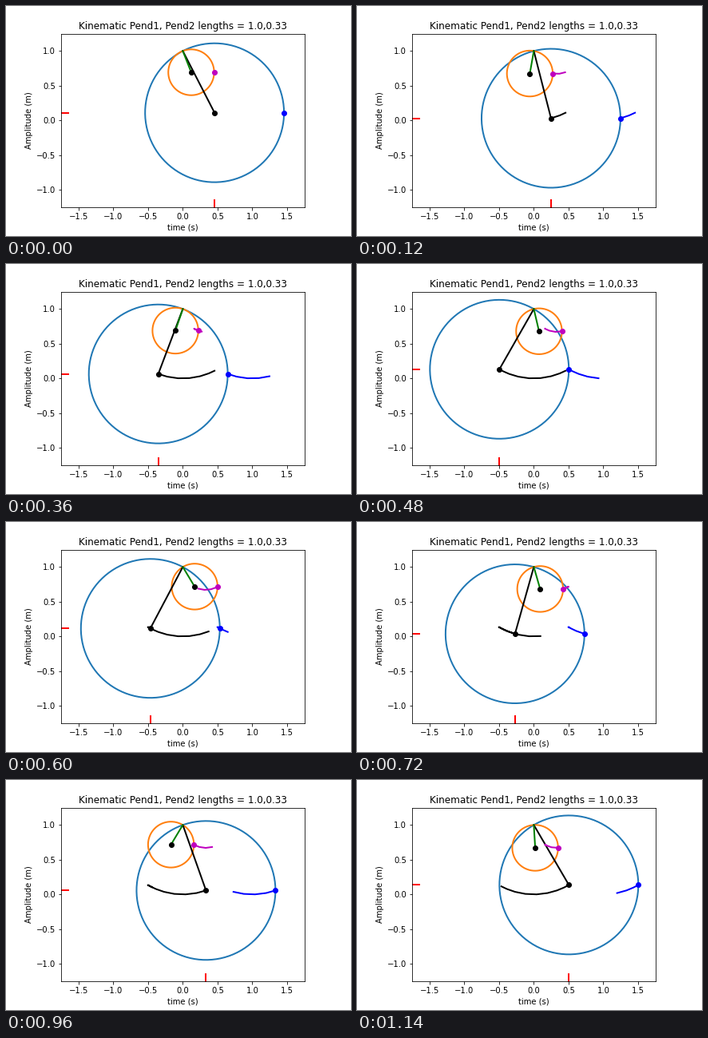
Animation of 432x288 px, one loop 1200 ms. Source, as a matplotlib script:

```python
import numpy as np
import matplotlib.pyplot as plt
from matplotlib.animation import FuncAnimation

plt.rcParams["font.family"] = "DejaVu Sans"

G, DT, FRAMES = 9.81, 0.1, 20
LENGTHS = (1.0, 0.33)
PIVOT = (0.0, 1.0)
X_LIM, Y_LIM = 1.75, 1.25


def swing(length, theta=np.pi / 6):
    """Bob positions from semi-implicit Euler steps, released at rest."""
    omega, path = 0.0, []
    for _ in range(FRAMES):
        omega -= G / length * np.sin(theta) * DT
        theta += omega * DT
        path.append((length * np.sin(theta), PIVOT[1] - length * np.cos(theta)))
    return np.array(path)


bobs = [swing(length) for length in LENGTHS]
rims = [bob + (length, 0) for bob, length in zip(bobs, LENGTHS)]

fig, ax = plt.subplots(figsize=(6, 4), dpi=72)
fig.subplots_adjust(left=0.125, right=0.9, bottom=0.125, top=0.88)
ax.set_aspect("equal")
ax.set(xlim=(-X_LIM, X_LIM), ylim=(-Y_LIM, Y_LIM),
       xticks=np.arange(-1.5, 1.6, 0.5), yticks=np.arange(-1, 1.1, 0.5),
       xlabel="time (s)", ylabel="Amplitude (m)",
       title="Kinematic Pend1, Pend2 lengths = 1.0,0.33")


def line(color, **style):
    return ax.plot([], [], color=color, lw=2, **style)[0]


circles = [line("C0"), line("C1")]
rods = [line("k"), line("g")]
trails = [(line("k"), bobs[0], 10), (line("b"), rims[0], 5), (line("m"), rims[1], 5)]
dots = [(line(color, marker="o"), path)
        for color, path in zip("kkbm", (*bobs, *rims))]
x_mark = line("r", marker="|", ms=20, mew=2)
y_mark = line("r", marker="_", ms=20, mew=2)

angle = np.linspace(0, 2 * np.pi, 200)
unit_circle = np.array([np.cos(angle), np.sin(angle)])


def update(i):
    for circle, rod, bob, length in zip(circles, rods, bobs, LENGTHS):
        x, y = bob[i]
        circle.set_data(x + length * unit_circle[0], y + length * unit_circle[1])
        rod.set_data([PIVOT[0], x], [PIVOT[1], y])
    for trail, path, size in trails:
        trail.set_data(*path[max(0, i + 1 - size):i + 1].T)
    for dot, path in dots:
        dot.set_data(*path[i:i + 1].T)
    x, y = bobs[0][i]
    x_mark.set_data([x], [-Y_LIM])
    y_mark.set_data([-X_LIM], [y])
    return []


anim = FuncAnimation(fig, update, frames=FRAMES, interval=60,
                     init_func=lambda: update(0), repeat=True)
plt.show()
```
